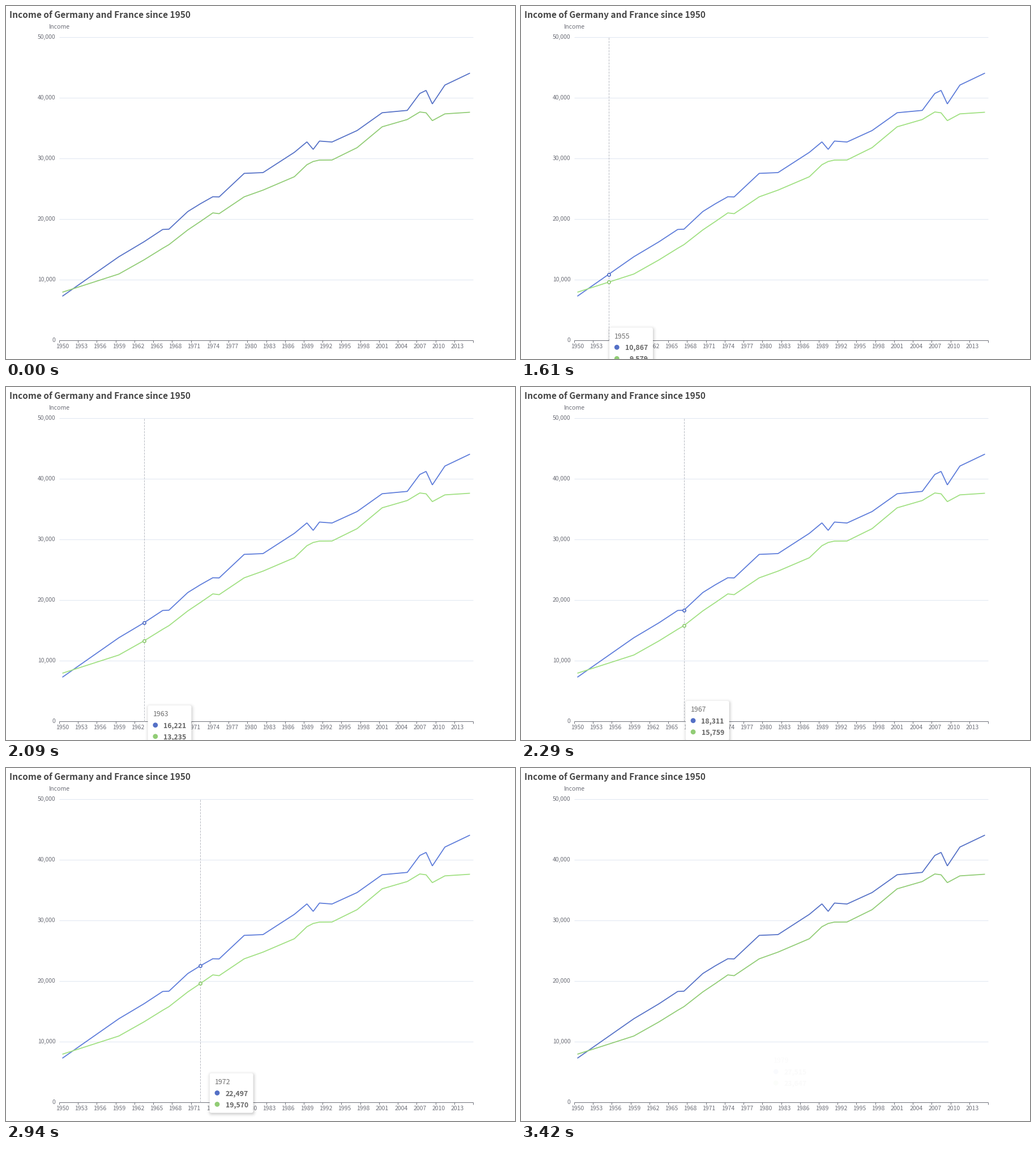
A matplotlib script for the animation above (4710 ms loop, 899 px wide and 623 px high).

```python
import numpy as np
import matplotlib.pyplot as plt
from matplotlib.animation import FuncAnimation
from matplotlib.patches import Circle, FancyBboxPatch

W, H, DPI = 899, 623, 100
LOOP, STEP = 4710, 10
PT = 72 / DPI
LEFT, RIGHT, TOP, BOTTOM = 94, 825, 54.8, 589.8
FONT = "Noto Sans CJK JP"
GREY, GRID = "#6e7079", "#e0e6f1"
BLUE, GREEN = np.array([84, 112, 198]) / 255, np.array([145, 204, 117]) / 255

# Turning points of both curves; the years between are interpolated
FIRST, LAST = 1950, 2015
turns = np.array([
    (1950, 7251, 7914), (1959, 13759, 10911), (1963, 16221, 13235),
    (1966, 18262, 15158), (1967, 18311, 15759), (1970, 21218, 18185),
    (1972, 22497, 19570), (1974, 23662, 20996), (1975, 23630, 20867),
    (1979, 27515, 23647), (1982, 27645, 24753), (1987, 30986, 26963),
    (1989, 32706, 28942), (1990, 31476, 29476), (1991, 32844, 29707),
    (1993, 32689, 29719), (1997, 34578, 31756), (2001, 37517, 35197),
    (2005, 37901, 36395), (2007, 40693, 37641), (2008, 41199, 37505),
    (2009, 38975, 36215), (2011, 42080, 37328), (2015, 44053, 37599)])
years = np.arange(FIRST, LAST + 1)
germany, france = (np.interp(years, turns[:, 0], turns[:, k]).round()
                   for k in (1, 2))
COUNT = len(years)
BAND = (RIGHT - LEFT) / COUNT


def x_of(i):
    return LEFT + (i + 0.5) * BAND


def y_of(value):
    return BOTTOM - np.asarray(value) * (BOTTOM - TOP) / 50000


fig = plt.figure(figsize=(W / DPI, H / DPI), dpi=DPI, facecolor="white")
ax = fig.add_axes([0, 0, 1, 1])
ax.set_xlim(0, W)
ax.set_ylim(H, 0)
ax.axis("off")


def label(x, y, s, size, color=GREY, ha="left", weight="normal", z=3):
    return ax.text(x, y, s, fontsize=size * PT, color=color, ha=ha,
                   va="baseline", family=FONT, weight=weight, zorder=z)


# Static chart
label(6.5, 20.8, "Income of Germany and France since 1950", 15.43, "#464646",
      weight="bold")
label(LEFT, 40, "Income", 10.6, ha="center")
for v in range(0, 50001, 10000):
    label(87.5, y_of(v) + 3.2, f"{v:,}", 10.4, ha="right")
ax.hlines(y_of(range(10000, 50001, 10000)), LEFT, RIGHT, GRID, lw=PT, zorder=1)
ax.hlines(BOTTOM, LEFT, RIGHT, GREY, lw=PT, zorder=2)
ax.vlines(LEFT + BAND * np.arange(0, COUNT + 1, 3), BOTTOM, BOTTOM + 4.5,
          GREY, lw=PT, zorder=2)
for i in range(0, COUNT, 3):
    label(x_of(i), 604.3, str(years[i]), 10.4, ha="center")

# Series, pointer and point markers
series = [(germany, BLUE), (france, GREEN)]
xs = x_of(np.arange(COUNT))
lines = [ax.plot(xs, y_of(d), color=c, lw=1.75 * PT, solid_joinstyle="bevel",
                 solid_capstyle="butt", zorder=4)[0] for d, c in series]
pointer, = ax.plot([], [], color="#b5b8c0", lw=0.95 * PT, dashes=(3.8, 1.9),
                   zorder=3)
dots = [ax.plot([], [], "o", ms=5.2 * PT, mfc="white", mec=c, mew=1.75 * PT,
                zorder=5)[0] for d, c in series]

# Tooltip
TIP_W, TIP_H = 77, 70


def box(z, color):
    return ax.add_patch(FancyBboxPatch((0, 0), 1, 1, zorder=z, lw=0, fc=color))


def place_box(patch, x, y, grow, radius):
    patch.set_boxstyle("round", pad=0, rounding_size=radius)
    patch.set_bounds(x - grow, y - grow, TIP_W + 2 * grow, TIP_H + 2 * grow)


SPREAD = np.arange(-3.5, 7, 1)
shadows = [box(6, "black") for _ in SPREAD]
panel = box(7, "white")
year = label(0, 0, "", 12.4, "#707070", z=8)
values = [label(0, 0, "", 12.3, "#666666", "right", "bold", z=8)
          for _ in series]
bullets = [ax.add_patch(Circle((0, 0), 4.4, fc=c, lw=0, zorder=8))
           for d, c in series]
tip = shadows + [panel, year] + values + bullets

# The tooltip trails the mouse by LAG ms and stands GAP px to its right
START, LEAVE, FADE, END = 1390, 3130, 3210, 3420
LAG, GAP = 70, 18
PATH_X = ([1390, 1830, 1910, 2090, 2490, 2790, 3000, 3180, 3420],
          [104, 208, 224, 250.5, 331, 359, 360, 434, 437])
PATH_Y = ([104, 208, 250, 331, 359, 437], [569, 566, 562, 546, 539, 501])


def ease_out(p):
    return 1 - (1 - min(max(p, 0), 1)) ** 3


def draw(frame):
    t = (frame * STEP - 10) // 20 * 20 + 10
    shown = START <= t < LEAVE
    x = np.interp(t, *PATH_X)
    y = np.interp(x, *PATH_Y)
    i = int((np.interp(t + LAG, *PATH_X) - GAP - LEFT) // BAND)

    # Lines brighten while the pointer is over the chart
    lift = ease_out((t - START) / 300) - ease_out((t - LEAVE) / 280)
    for line, dot, (data, c) in zip(lines, dots, series):
        line.set_color(np.minimum(c * (1 + 0.1 * lift), 1))
        dot.set_visible(shown)
        dot.set_data([x_of(i)], [y_of(data[i])])
    pointer.set_visible(shown)
    pointer.set_data([x_of(i)] * 2, [BOTTOM, TOP])

    alpha = ease_out((t - START) / 200)
    if t >= FADE:
        alpha = max(1 - ease_out((t - FADE) / (END - FADE)), 0.03)
    for part in tip:
        part.set_visible(t > START)
        part.set_alpha(alpha)
    for patch, grow in zip(shadows, SPREAD):
        place_box(patch, x + 0.9, y + 1.8, grow, 4 + max(grow, 0))
        patch.set_alpha(alpha * 0.034 * np.exp(-(grow / 4.5) ** 2))
    place_box(panel, x, y, 0, 3.5)
    year.set_position((x + 9, y + 19.2))
    year.set_text(str(years[i]))
    for k, (data, _) in enumerate(series):
        mid = y + 35 + 20 * k
        values[k].set_position((x + 68, mid + 4.3))
        values[k].set_text(f"{data[i]:,.0f}")
        bullets[k].center = (x + 13.3, mid - 0.2)
    return lines + dots + [pointer] + tip


anim = FuncAnimation(fig, draw, frames=LOOP // STEP, interval=STEP,
                     repeat=True, repeat_delay=0, blit=False)
plt.show()
```
